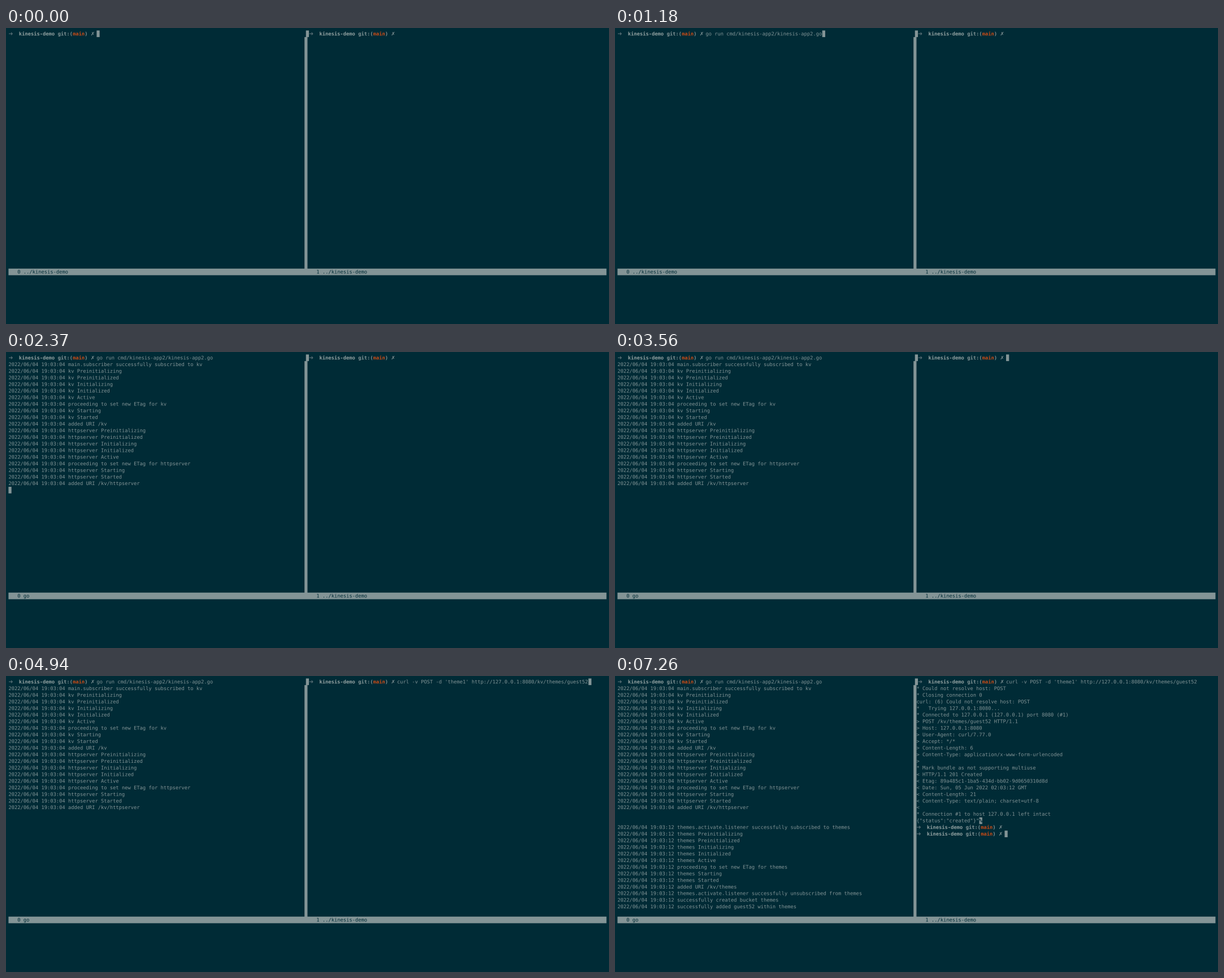
Animation, 1067 px wide and 525 px high, one loop 8000 ms. Source, as an HTML page with a canvas:

```html
<!DOCTYPE html>
<html lang="en">
<head>
<meta charset="utf-8">
<title>Terminal session</title>
<style>
html, body { margin: 0; width: 100%; height: 100%; overflow: hidden; background: #002b36; }
canvas { display: block; width: 1067px; height: 525px; }
</style>
</head>
<body>
<canvas id="screen" width="1067" height="525"></canvas>
<script>
const LOOP = 8000, W = 1067, H = 525, SS = 4;
const FONT = 8.788, CELL = 5.2907, ROW = 11.732, PAD = 4.4, ARROW_EXTRA = 2.55;
const BG = '#002b36', FG = '#839496', BRIGHT = '#93a1a1', ORANGE = '#cb4b16', DIM = '#586e75';
const MONO = '"DejaVu Sans Mono", monospace', SANS = '"DejaVu Sans", sans-serif';

// The terminal is painted oversized and scaled down, so cells keep fractional edges.
const screen = document.getElementById('screen').getContext('2d');
const big = document.createElement('canvas');
big.width = W * SS;
big.height = H * SS;
const ctx = big.getContext('2d');
ctx.scale(SS, SS);
ctx.textRendering = 'geometricPrecision';
screen.imageSmoothingQuality = 'high';

const items = [];

// Each wide arrow earlier in a row pushes the rest of that row to the right.
const cellX = (col, arrows) => PAD + col * CELL + arrows * ARROW_EXTRA;
const cellY = row => PAD + row * ROW;
const add = (paint, { from = 0, to = LOOP }) => items.push({ paint, from, to });

function box(row, col, cols, rows, opt = {}) {
  add(() => {
    ctx.fillStyle = FG;
    ctx.fillRect(cellX(col, opt.arrows || 0), cellY(row), cols * CELL, rows * ROW);
  }, opt);
}

function text(row, col, str, opt = {}) {
  const { arrows = 0, color = FG, bold = false, family = MONO, size = FONT } = opt;
  add(() => {
    ctx.font = `${bold ? 'bold ' : ''}${size}px ${family}`;
    ctx.fillStyle = color;
    ctx.fillText(str, cellX(col, arrows), cellY(row) + ROW * 0.75);
  }, opt);
}

const lines = (row, col, from, list) =>
  list.forEach((line, i) => text(row + i, col, line, { from }));

function prompt(row, col, arrows, from) {
  text(row, col, '➜', { arrows, from, color: DIM, bold: true, family: SANS, size: 9.8 });
  const part = (at, str, color) => text(row, col + at, str, { arrows: arrows + 1, from, color, bold: true });
  part(3, 'kinesis-demo', BRIGHT);
  part(16, 'git:(', FG);
  part(21, 'main', ORANGE);
  part(25, ')', FG);
  text(row, col + 27, '✗', { arrows: arrows + 1, from, family: SANS });
}

const lifecycle = name => ['Preinitializing', 'Preinitialized', 'Initializing', 'Initialized', 'Active']
  .map(s => `${name} ${s}`)
  .concat(`proceeding to set new ETag for ${name}`, `${name} Starting`, `${name} Started`);
const log = (time, list) => list.map(l => `2022/06/04 ${time} ${l}`);

// Window frame and status bar
box(0, 99, 1, 1, { arrows: 1 });
box(1, 99, 1, 35);
box(36, 0, 200, 1);
text(36, 3, '0 ../kinesis-demo', { color: BG, to: 1910 });
text(36, 3, '0 go', { color: BG, from: 1910 });
text(36, 103, '1 ../kinesis-demo', { color: BG });

// Left pane
const runCmd = 'go run cmd/kinesis-app2/kinesis-app2.go';
prompt(0, 0, 0, 0);
text(0, 29, runCmd, { arrows: 1, from: 590 });
lines(1, 0, 2370, log('19:03:04', [
  'main.subscriber successfully subscribed to kv',
  ...lifecycle('kv'), 'added URI /kv',
  ...lifecycle('httpserver'), 'added URI /kv/httpserver'
]));
lines(22, 0, 6140, log('19:03:12', [
  'themes.activate.listener successfully subscribed to themes',
  ...lifecycle('themes'), 'added URI /kv/themes',
  'themes.activate.listener successfully unsubscribed from themes',
  'successfully created bucket themes',
  'successfully added guest52 within themes'
]));

// Right pane
const curlCmd = "curl -v POST -d 'theme1' http://127.0.0.1:8080/kv/themes/guest52";
prompt(0, 100, 1, 0);
text(0, 129, curlCmd, { arrows: 2, from: 4220 });
lines(1, 100, 6140, `* Could not resolve host: POST
* Closing connection 0
curl: (6) Could not resolve host: POST
*   Trying 127.0.0.1:8080...
* Connected to 127.0.0.1 (127.0.0.1) port 8080 (#1)
> POST /kv/themes/guest52 HTTP/1.1
> Host: 127.0.0.1:8080
> User-Agent: curl/7.77.0
> Accept: */*
> Content-Length: 6
> Content-Type: application/x-www-form-urlencoded
>
* Mark bundle as not supporting multiuse
< HTTP/1.1 201 Created
< Etag: 89a485c1-1ba5-434d-bb02-9d0650310d8d
< Date: Sun, 05 Jun 2022 02:03:12 GMT
< Content-Length: 21
< Content-Type: text/plain; charset=utf-8
<
* Connection #1 to host 127.0.0.1 left intact
{"status":"created"}"`.split('\n'));
box(21, 121, 1, 1, { from: 6140 });
text(21, 121, '%', { from: 6140, color: BG, bold: true });
prompt(22, 100, 0, 6140);
prompt(23, 100, 0, 7260);

// Cursor: time, row, column, arrows before it, character under it
const typed = (start, step, col, arrows, cmd) =>
  [1, 2, 3].map(n => [start + (n - 1) * step, 0, col + n, arrows, cmd[n]]);
const moves = [
  [0, 0, 29, 1],
  ...typed(590, 95, 29, 1, runCmd),
  [1180, 0, 29 + runCmd.length, 1],
  [1910, 1, 0, 0],
  [2370, 20, 0, 0],
  [2830, 21, 0, 0],
  [3230, 22, 0, 0],
  [3560, 0, 129, 2],
  ...typed(4220, 95, 129, 2, curlCmd),
  [4940, 0, 129 + curlCmd.length, 2],
  [6140, 22, 129, 1],
  [7200, 23, 100, 0],
  [7260, 23, 129, 1]
];
moves.forEach(([from, row, col, arrows, char = ''], i) => {
  const span = { arrows, from, to: i + 1 < moves.length ? moves[i + 1][0] : LOOP };
  box(row, col, 1, 1, span);
  text(row, col, char, { ...span, color: BG });
});

// Everything changes together with the cursor, so repaint only when it moves.
let shown = -1;
function draw() {
  const t = performance.now() % LOOP;
  const step = moves.filter(m => m[0] <= t).length;
  if (step !== shown) {
    shown = step;
    ctx.fillStyle = BG;
    ctx.fillRect(0, 0, W, H);
    for (const { paint, from, to } of items) if (t >= from && t < to) paint();
    screen.drawImage(big, 0, 0, W, H);
  }
  requestAnimationFrame(draw);
}
draw();
</script>
</body>
</html>
```
